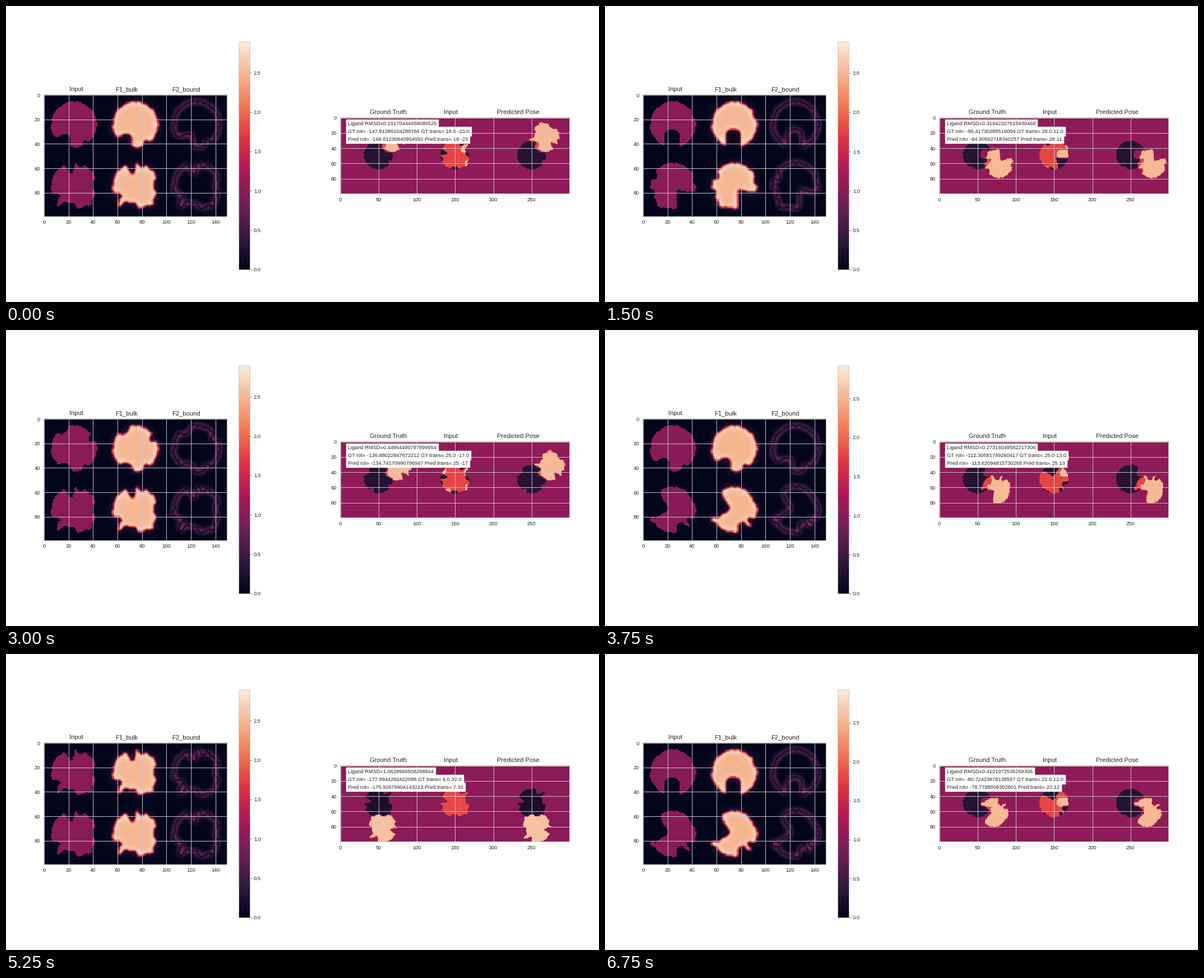
Write a matplotlib script that moves like this. It is 1058 by 529 pixels and loops after 7500 ms.

```python
import numpy as np
import matplotlib.pyplot as plt
from matplotlib.animation import FuncAnimation
from matplotlib.colors import LinearSegmentedColormap

W, H, DPI = 1058, 529, 64
PT = 72 / DPI            # points per pixel
INK, RULE = "0.15", "0.8"
SMALL, LARGE, LINE = 9.25 * PT, 11.1 * PT, 0.93 * PT
CELL = 50                # side of one shape patch
STAGE = 100              # side of one docking panel
MIDDLE = 267.15          # vertical centre of all axes

plt.rcParams["font.family"] = "Liberation Sans"

ROCKET = LinearSegmentedColormap.from_list("rocket", [
    "#03051a", "#35193e", "#701f57", "#ad1759",
    "#e13342", "#f37651", "#f6b48f", "#faebdd"], N=256)


def stroke(x, y, points, width):
    """Cells within width of a polyline."""
    hit = np.zeros(x.shape, bool)
    for (ax, ay), (bx, by) in zip(points, points[1:]):
        dx, dy = bx - ax, by - ay
        t = np.clip(((x - ax) * dx + (y - ay) * dy) / (dx * dx + dy * dy), 0, 1)
        hit |= np.hypot(x - ax - t * dx, y - ay - t * dy) < width
    return hit


def blob(*bites, arms=(), cuts=(), rough=0.5):
    """Rough disc; a bite is (angle, depth, half width), angles clockwise."""
    y, x = np.mgrid[:CELL, :CELL] + 0.5
    mid = CELL / 2
    angle = np.degrees(np.arctan2(y - mid, x - mid)) % 360
    noise = np.random.default_rng(4).uniform(-rough, rough, 45)
    radius = 18.6 + np.interp(angle, np.arange(45) * 8, noise, period=360)
    for at, depth, half in bites:
        off = (angle - at + 180) % 360 - 180
        radius -= depth * np.exp(-(off / half) ** 6)
    mask = np.hypot(x - mid, y - mid) < radius
    for arm in arms:
        mask |= stroke(x, y, *arm)
    for cut in cuts:
        mask &= ~stroke(x, y, *cut)
    return mask.astype(float)


DISC = blob((122, 9, 20), (60, 3, 8))
HORNS = blob((0, 3.5, 16), (105, 4.5, 20), (150, 4.5, 10), (129, -2.5, 4),
             (50, -2, 8), (258, 9, 11), (286, 3, 8))
STEP = blob((49, 13, 27), (162, 3, 10), (208, 4, 10), (348, 2, 10), (124, -2, 8))
CAP = blob((7, 14, 31), (60, 5, 14), (124, 4, 12), (168, 8, 18),
           arms=[([(32, 34), (41, 31.5), (43, 28)], 1.5), ([(10, 33.5), (20, 33.5)], 1.4)])
PEBBLE = blob((330, 4.5, 10), (60, 3, 8), (115, 5, 17), (238, 3.5, 14))
HOOK = blob((65, 15, 42), rough=1.4,
            arms=[([(40.5, 29), (39.5, 36), (35, 39.5), (28, 42.3)], 1.9)])
JAW = blob((155, 17, 52), arms=[([(8, 28), (14, 33), (20, 38), (28, 39)], 2.4)])
ARCH = blob((335, 1.5, 10), cuts=[([(24, 35), (24, 50)], 6.4)])
CLAW = blob((192, 14, 36), (33, 5, 8), (65, 6.5, 15), (328, 1.5, 14),
            arms=[([(8, 33), (18, 36)], 2)])

# receptor, ligand, feature maximum, RMSD, true pose, predicted pose;
# poses are (angle, dx, dy), angles kept as text for the labels
SCENES = [
    (DISC, HORNS, 2.898, "0.19170444658085525",
     ("-147.91086104288766", 18, -23), ("-148.81230940954592", 18, -23)),
    (STEP, STEP, 2.862, "0.0665352993665047",
     ("180.00000500895632", 27, 9), ("-179.7291060460953", 27, 9)),
    (ARCH, STEP, 2.9, "0.31842207615930468",
     ("-96.41730285516094", 28, 11), ("-94.90562718340257", 28, 11)),
    (CAP, CAP, 2.953, "1.227447125729381",
     ("-176.99164818902423", 8, 26), ("-179.9074013041893", 9, 26)),
    (PEBBLE, HORNS, 2.898, "0.44964499797899654",
     ("-136.88022847672212", 25, -17), ("-134.74170990796947", 25, -17)),
    (DISC, CLAW, 2.92, "0.27316049582217306",
     ("-112.30581749260417", 25, 13), ("-113.62094815730268", 25, 13)),
    (HOOK, JAW, 2.945, "0.22305600842521653",
     ("-100.77994663753672", 23, 9), ("-101.76910829351631", 23, 9)),
    (HORNS, HORNS, 2.898, "1.0628966508268844",
     ("-177.9944292422088", 6, 32), ("-179.92679904143213", 7, 32)),
    (ARCH, PEBBLE, 2.9, "0.3580217749316025",
     ("-128.16503927741853", 29, 10), ("-126.5938206417205", 29, 10)),
    (ARCH, CLAW, 2.924, "0.4101972535269306",
     ("-80.72423678138567", 22, 12), ("-78.7788008302801", 22, 12)),
]


def blur(mask, sigma):
    i = np.arange(CELL)
    k = np.exp(-(i[:, None] - i) ** 2 / (2 * sigma ** 2))
    k /= sigma * np.sqrt(2 * np.pi)
    return k @ mask @ k.T


def features(mask):
    """Mask, bulk response and boundary response side by side."""
    bulk = np.abs(3.6 * blur(mask, 1.0) - 1.1 * blur(mask, 2.5))
    bound = 3.2 * np.abs(blur(mask, 1.0) - blur(mask, 2.0))
    return np.hstack([mask, bulk, bound])


def on_stage(mask):
    # docking panels show the patches transposed
    return np.pad(mask.T, (STAGE - CELL) // 2)


def place(panel, pose):
    """Rotate about the centre with bilinear sampling, then shift cyclically."""
    angle, dx, dy = pose
    a = np.radians(float(angle))
    mid = (STAGE - 1) / 2
    v, u = np.mgrid[:STAGE, :STAGE] - mid
    x = np.clip(u * np.cos(a) + v * np.sin(a) + mid, 0, STAGE - 1.001)
    y = np.clip(v * np.cos(a) - u * np.sin(a) + mid, 0, STAGE - 1.001)
    x0, y0 = x.astype(int), y.astype(int)
    fx, fy = x - x0, y - y0
    top = panel[y0, x0] * (1 - fx) + panel[y0, x0 + 1] * fx
    low = panel[y0 + 1, x0] * (1 - fx) + panel[y0 + 1, x0 + 1] * fx
    return np.roll(top * (1 - fy) + low * fy, (dy, dx), axis=(0, 1))


def axes_at(x, y, w, h):
    ax = fig.add_axes([x / W, 1 - (y + h) / H, w / W, h / H])
    for spine in ax.spines.values():
        spine.set(color=RULE, linewidth=LINE)
    ax.tick_params(length=0, pad=6.2 * PT, labelsize=SMALL, labelcolor=INK)
    return ax


def image_axes(x, w, cols, xstep):
    h = w * STAGE / cols
    ax = axes_at(x, MIDDLE - h / 2, w, h)
    im = ax.imshow(np.zeros((STAGE, cols)), cmap=ROCKET, aspect="auto",
                   interpolation="nearest")
    ax.set_xticks(range(0, cols, xstep))
    ax.set_yticks(range(0, STAGE, 20))
    ax.grid(color=RULE, linewidth=LINE)
    return ax, im


def headings(y, items):
    for x, label in items:
        fig.text(x / W, 1 - y / H, label, size=LARGE, color=INK, va="baseline")


fig = plt.figure(figsize=(W / DPI, H / DPI), dpi=DPI, facecolor="white")

left, feature_im = image_axes(67.05, 327.3, 150, 20)
right, dock_im = image_axes(596, 409.3, 300, 50)
headings(152.4, [(113, "Input"), (195.5, "F1_bulk"), (296.5, "F2_bound")])
headings(193.4, [(649, "Ground Truth"), (781.5, "Input"), (876, "Predicted Pose")])

bar = axes_at(415, 63.5, 20.4, 407.3)
bar.imshow(np.linspace(0, 1, 256)[:, None], cmap=ROCKET, origin="lower",
           extent=(0, 1, 0, 1), aspect="auto")
bar.set_xticks([])
bar.yaxis.tick_right()
bar.tick_params(axis="y", length=3.24 * PT, width=0.74 * PT, color=INK,
                pad=3.24 * PT)

notes = [right.text(10, y, "", size=SMALL, color=INK, va="baseline",
                    bbox=dict(facecolor="white", edgecolor="white",
                              linewidth=0.5, pad=3.7 * PT))
         for y in (10, 20, 30)]


def draw(i):
    rec, lig, peak, rmsd, true, pred = SCENES[i]

    feature_im.set_data(np.vstack([features(rec), features(lig)]))
    feature_im.set_clim(0, peak)
    ticks = np.arange(0, peak, 0.5)
    bar.set_yticks(ticks / peak, [f"{t:.1f}" for t in ticks])

    rec, lig = on_stage(rec), on_stage(lig)
    panels = [2 * p - rec for p in (place(lig, true), lig, place(lig, pred))]
    dock_im.set_data(np.hstack(panels))
    # slanted rotations overshoot and widen the colour range
    slant = min(1, 20 * abs(np.sin(np.radians(float(true[0])))))
    dock_im.set_clim(-1 - 0.4 * slant, 2.1 + 0.42 * slant)

    notes[0].set_text(f"Ligand RMSD={rmsd}")
    notes[1].set_text(f"GT rot= {true[0]} GT trans= {true[1]:.1f} {true[2]:.1f}")
    notes[2].set_text(f"Pred rot= {pred[0]} Pred trans= {pred[1]} {pred[2]}")
    return [feature_im, dock_im, *notes]


anim = FuncAnimation(fig, draw, frames=len(SCENES), interval=750,
                     repeat=True, repeat_delay=0, blit=False)
plt.show()
```
